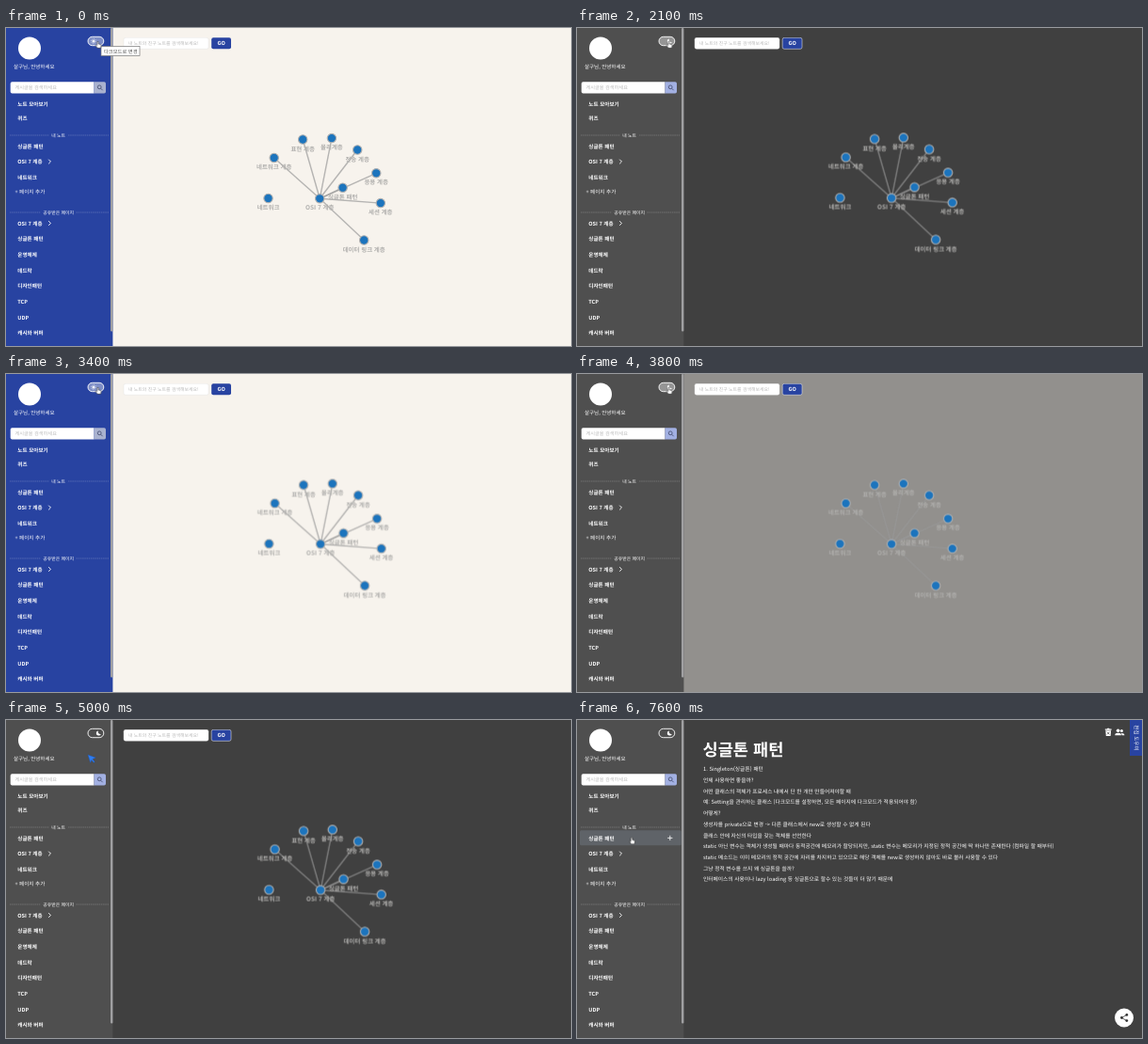
Write an HTML page that moves like this. It is 600x338 px and loops after 8000 ms.

```html
<!DOCTYPE html>
<html lang="ko">
<head>
<meta charset="utf-8">
<title>Note graph</title>
<style>
html, body { margin: 0; width: 100%; height: 100%; overflow: hidden; background: #404040; }
svg { display: block; width: 600px; height: 338px; }
text {
  font-family: "Noto Sans CJK KR", "Noto Sans CJK", "Noto Sans CJK JP", sans-serif;
  text-rendering: geometricPrecision;
  fill: #fff;
}
.b { font-weight: 700; }
.m { font-weight: 500; }

/* theme: dark at 450 ms, light at 2150 ms, dark at 3480 ms */
.main { animation: main 8s ease infinite; }
.side { animation: side 8s step-end infinite; }
.find { animation: find 8s step-end infinite; }
.dark { animation: dark 8s step-end infinite; }
.light { animation: light 8s step-end infinite; }
@keyframes main {
  0%, 5.625% { fill: #f7f3ed; }
  18.125%, 26.875% { fill: #404040; }
  39.375%, 43.5% { fill: #f7f3ed; }
  56%, 100% { fill: #404040; }
}
@keyframes side {
  0%, 26.875% { fill: #2843a1; }
  5.625%, 43.5%, 100% { fill: #4f4f4f; }
}
@keyframes find {
  0%, 26.875% { fill: #a9b2cf; }
  5.625%, 43.5%, 100% { fill: #a2b0e2; }
}
@keyframes dark {
  0%, 26.875% { opacity: 0; }
  5.625%, 43.5%, 100% { opacity: 1; }
}
@keyframes light {
  0%, 26.875% { opacity: 1; }
  5.625%, 43.5%, 100% { opacity: 0; }
}

.tip { animation: tip 8s linear infinite; }
@keyframes tip { 0%, 1% { opacity: 1; } 3.2%, 100% { opacity: 0; } }

.drift { animation: drift 8s ease-in-out infinite; }
@keyframes drift {
  0%, 1% { transform: translate(-.8px, .5px); }
  7%, 100% { transform: none; }
}

.hover { animation: hover 8s step-end infinite; }
@keyframes hover { 0% { opacity: .4; } 61%, 100% { opacity: 0; } }
.row { animation: row 8s step-end infinite; }
@keyframes row { 0% { opacity: 0; } 88%, 100% { opacity: 1; } }
.home { animation: home 8s step-end infinite; }
@keyframes home { 0% { opacity: 1; } 91%, 100% { opacity: 0; } }
.page { animation: page 8s step-end infinite; }
@keyframes page { 0% { opacity: 0; } 92.2%, 100% { opacity: 1; } }

.cursor { animation: move 8s ease-in-out infinite; }
@keyframes move {
  0%, 60.6% { transform: translate(97.5px, 14px); }
  62.5% { transform: translate(87px, 37px); }
  71.25%, 81.25% { transform: translate(304px, 200px); }
  89%, 100% { transform: translate(58px, 124.5px); }
}
.hand { animation: hand 8s step-end infinite; }
.arrow { animation: arrow 8s step-end infinite; }
@keyframes hand { 0%, 88% { opacity: 1; } 61%, 87.9% { opacity: 0; } 100% { opacity: 1; } }
@keyframes arrow { 0%, 88% { opacity: 0; } 61% { opacity: 1; } 100% { opacity: 0; } }
</style>
</head>
<body>
<svg viewBox="0 0 600 338">
  <rect class="main" width="600" height="338"/>

  <g class="home">
    <rect x="125" y="10.3" width="90" height="12" rx="2" fill="#fff" stroke="#ddd" stroke-width=".4"/>
    <text x="130" y="18.1" font-size="4.9" style="fill:#b9b9b9">내 노트와 친구 노트를 검색해보세요!</text>
    <rect x="218.2" y="10.3" width="20.8" height="12" rx="2" fill="#2843a1"/>
    <rect class="dark" x="218.2" y="10.3" width="20.8" height="12" rx="2" fill="none" stroke="#ddd" stroke-width=".6"/>
    <text class="b" x="228.6" y="18.3" font-size="5.6" text-anchor="middle">GO</text>
    <g id="graph" class="drift"></g>
  </g>

  <g id="page" class="page">
    <text class="b" x="133.5" y="37.6" font-size="17.6">싱글톤 패턴</text>
    <g fill="#fff">
      <path d="M560.8 9.6h2l.6-.8h1.6l.6.8h2v1.1h-6.8zM561.3 11.3h5.8l-.5 5.7h-4.8z"/>
      <circle cx="574.6" cy="11.3" r="1.8"/>
      <path d="M571.3 16.2q0-2.4 3.3-2.4t3.3 2.4z"/>
      <circle cx="578.4" cy="11.4" r="1.5"/>
      <path d="M578.6 16.2q0-1.5-1-2.3 3.8-.2 3.8 2.3z"/>
    </g>
    <path d="M563 12.8l2.4 2.6m0-2.6l-2.4 2.6" stroke="#404040" stroke-width=".7"/>
    <rect x="587" width="13" height="38" fill="#2843a1"/>
    <text class="m" font-size="5.6" text-anchor="middle" transform="translate(591.5 19) rotate(90)">편집 도우미</text>
    <circle cx="581" cy="316.5" r="10" fill="#fff"/>
    <path d="M583.8 313.4l-5.4 3.1 5.4 3.1" fill="none" stroke="#333" stroke-width=".8"/>
    <g fill="#333"><circle cx="583.8" cy="313.4" r="1.4"/><circle cx="578.4" cy="316.5" r="1.4"/><circle cx="583.8" cy="319.6" r="1.4"/></g>
  </g>

  <g id="side">
    <rect class="side" width="113.4" height="338"/>
    <rect x="111" width="2.4" height="322.5" rx="1" fill="#a0a0a2"/>
    <circle cx="25" cy="21.5" r="12" fill="#fff"/>
    <text class="m" x="8" y="43" font-size="5.5">살구님, 안녕하세요</text>

    <rect class="hover" x="87" y="9.3" width="16.8" height="9.4" rx="4.7" fill="#fff"/>
    <rect x="87" y="9.3" width="16.8" height="9.4" rx="4.7" fill="none" stroke="#fff" stroke-width=".9"/>
    <g class="light">
      <circle cx="93" cy="14" r="1.5" fill="#fff"/>
      <circle cx="93" cy="14" r="2.5" fill="none" stroke="#fff" stroke-width=".8" stroke-dasharray=".7 1.26"/>
    </g>
    <path class="dark" d="M98 11.4a2.6 2.6 0 1 0 2.8 3.5 2.4 2.4 0 0 1-2.8-3.5z" fill="#fff"/>

    <path d="M6.5 57.3H93.5V69.5H6.5a1.8 1.8 0 0 1-1.8-1.8V59.1a1.8 1.8 0 0 1 1.8-1.8z" fill="#fff"/>
    <path class="find" d="M93.5 57.3h10.7a1.8 1.8 0 0 1 1.8 1.8v8.6a1.8 1.8 0 0 1-1.8 1.8H93.5z"/>
    <g fill="none" stroke="#40496b" stroke-width=".8"><circle cx="99.2" cy="62.8" r="1.9"/><path d="M100.6 64.2l2 2"/></g>
    <text x="9.5" y="65.2" font-size="5.2" style="fill:#bbb">게시글을 검색하세요</text>

    <path d="M4 114H46M66 114H109M4 196H37M74.5 196H109" stroke="#fff" stroke-opacity=".4" stroke-width=".5" stroke-dasharray="1.5 .7"/>
    <text class="m" x="55.7" y="115.8" font-size="4.9" text-anchor="middle">내 노트</text>
    <text class="m" x="55.7" y="197.8" font-size="4.9" text-anchor="middle">공유받은 페이지</text>
    <g class="row">
      <rect x="3" y="117.3" width="107.8" height="16" rx="1.5" fill="#5f6368"/>
      <path d="M96.2 125.4h5.2m-2.6-2.6v5.2" stroke="#fff" stroke-width=".8"/>
    </g>
    <path d="M45.2 139.7l2.3 2.3-2.3 2.3M45.2 205.2l2.3 2.3-2.3 2.3" fill="none" stroke="#fff" stroke-width=".9"/>
    <text class="m" x="9.4" y="176.1" font-size="5.6">+ 페이지 추가</text>
  </g>

  <g class="tip">
    <rect x="101" y="19.5" width="41" height="10" fill="#fff" stroke="#777" stroke-width=".7"/>
    <text x="104" y="26.6" font-size="5.3" style="fill:#555">다크모드로 변경</text>
  </g>

  <g class="cursor">
    <path class="hand" d="M-.8.7q.8-1 1.6 0V3l2 .5q1 .4.8 1.5L3 7.3H-.4L-2.4 4.6q.3-.9 1.6 0z" fill="#fff" stroke="#222" stroke-width=".5"/>
    <path class="arrow" d="M0 0l8.3 3.1-3.4 1.5 2.3 2.8-1 .9-2.4-2.8L2.7 8.4z" fill="#2f7df0" stroke="#1d55b5" stroke-width=".4"/>
  </g>
</svg>
<script>
const add = (parent, tag, attrs, text = '') => {
  const el = document.createElementNS('http://www.w3.org/2000/svg', tag);
  for (const key in attrs) el.setAttribute(key, attrs[key]);
  el.textContent = text;
  parent.append(el);
};
const byId = id => document.getElementById(id);

const menu = [
  ['노트 모아보기', 80.5], ['퀴즈', 96], ['싱글톤 패턴', 125.5], ['OSI 7 계층', 142],
  ['네트워크', 158.8], ['OSI 7 계층', 207.6], ['싱글톤 패턴', 224.3], ['운영체제', 241],
  ['데드락', 257.5], ['디자인패턴', 274], ['TCP', 290.7], ['UDP', 307.4], ['캐시와 버퍼', 324]
];
for (const [label, y] of menu)
  add(byId('side'), 'text', { class: 'b', x: 12.3, y: y + 2.1, 'font-size': 5.6 }, label);

const hub = [334, 180.8];
const leaves = [
  ['네트워크 계층', 285.5, 137.5], ['표현 계층', 316, 118], ['물리계층', 346.7, 116.6],
  ['전송 계층', 374, 129], ['응용 계층', 394, 153.8], ['싱글톤 패턴', 358.4, 169.2],
  ['세션 계층', 398.6, 185.6], ['데이터 링크 계층', 381, 225]
];
const nodes = [...leaves, ['OSI 7 계층', ...hub], ['네트워크', 279.3, 180.5]];
const graph = byId('graph');
for (const [, x, y] of leaves)
  add(graph, 'line', { x1: hub[0], y1: hub[1], x2: x, y2: y, stroke: '#999', 'stroke-opacity': .7, 'stroke-width': 1.4 });
for (const [, cx, cy] of nodes)
  add(graph, 'circle', { cx, cy, r: 4.7, fill: '#1c74bd', stroke: '#b0b0b0', 'stroke-width': 1.1 });
for (const [label, x, y] of nodes)
  add(graph, 'text', { class: 'b', x, y: y + 12.1, 'font-size': 6.45, 'text-anchor': 'middle', style: 'fill:#b0afad' }, label);

const lines = [
  '1. Singleton(싱글톤) 패턴',
  '언제 사용하면 좋을까?',
  '어떤 클래스의 객체가 프로세스 내에서 단 한 개만 만들어져야할 때',
  '예: Setting을 관리하는 클래스 (다크모드를 설정하면, 모든 페이지에 다크모드가 적용되어야 함)',
  '어떻게?',
  '생성자를 private으로 변경 -> 다른 클래스에서 new로 생성할 수 없게 된다',
  '클래스 안에 자신의 타입을 갖는 객체를 선언한다',
  'static 아닌 변수는 객체가 생성될 때마다 동적공간에 메모리가 할당되지만, static 변수는 메모리가 지정된 정적 공간에 딱 하나만 존재한다 (컴파일 할 때부터)',
  'static 메소드는 이미 메모리의 정적 공간에 자리를 차지하고 있으므로 해당 객체를 new로 생성하지 않아도 바로 불러 사용할 수 있다',
  '그냥 정적 변수를 쓰지 왜 싱글톤을 쓸까?',
  '인터페이스의 사용이나 lazy loading 등 싱글톤으로 할수 있는 것들이 더 많기 때문에'
];
lines.forEach((line, i) =>
  add(byId('page'), 'text', { class: 'm', x: 134, y: 54.2 + i * 11.72, 'font-size': 5.74 }, line));
</script>
</body>
</html>
```
